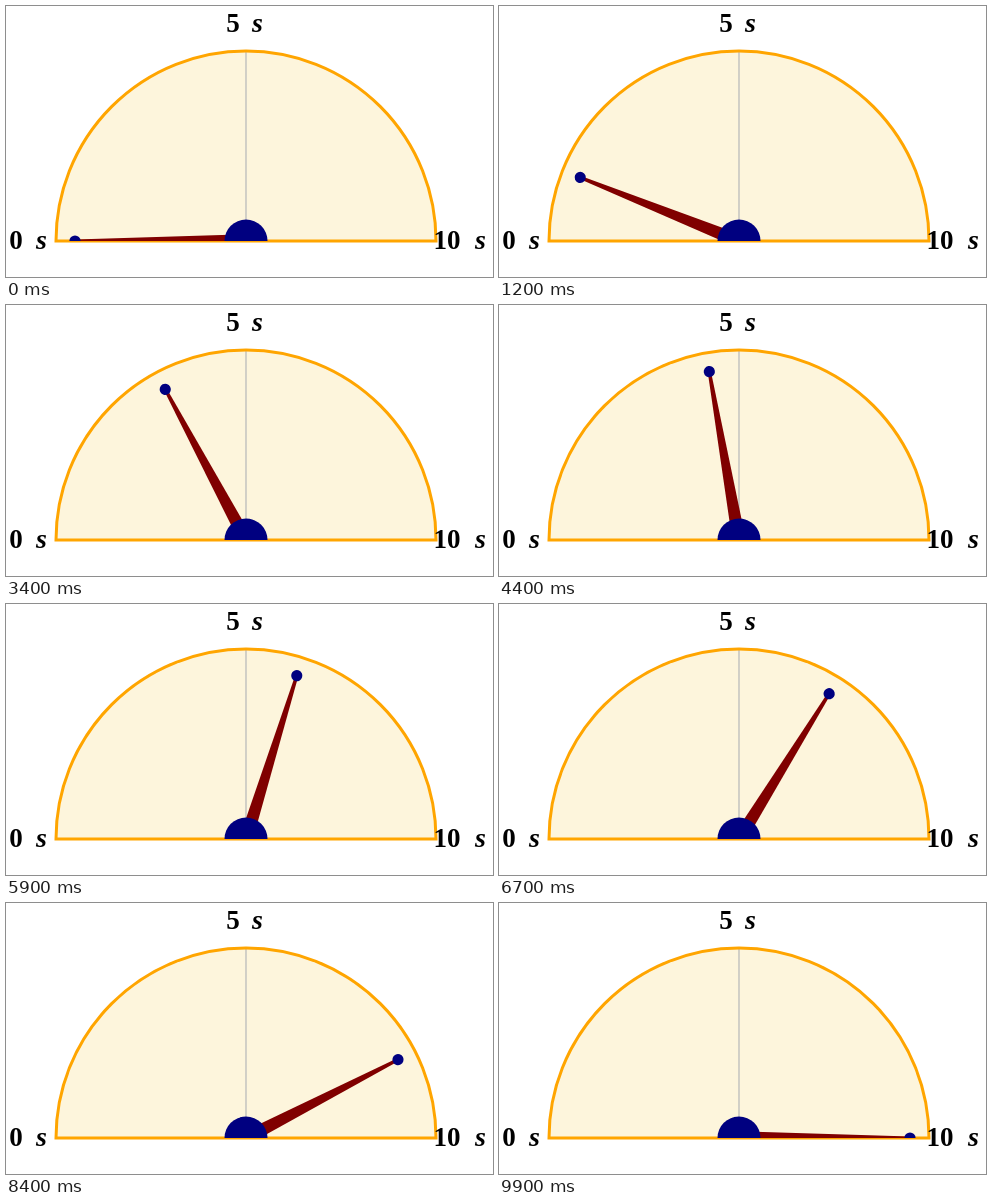
These frames come from a looping animation (487x271 px, 10 s). An HTML page:

```html
<!DOCTYPE html>
<html lang="en">
<head>
<meta charset="utf-8">
<title>Ten second gauge</title>
<style>
  html, body { margin: 0; width: 100%; height: 100%; overflow: hidden; background: #fff; }
  svg { display: block; width: 487px; height: 271px; }
  text { font: bold 27px "Liberation Serif", "Times New Roman", serif; text-anchor: middle; }
  .unit { font-style: italic; font-size: 28px; }
</style>
</head>
<body>
<svg viewBox="0 0 487 271">
  <clipPath id="upper"><rect width="487" height="235"/></clipPath>
  <path d="M50 235A190 190 0 0 1 430 235Z" fill="#fdf5dc"/>
  <path d="M240 45V235" stroke="#bbb" stroke-width="1.3"/>
  <path d="M50 235A190 190 0 0 1 430 235Z" fill="none" stroke="#ffa500" stroke-width="3"/>
  <g clip-path="url(#upper)">
    <g id="needle">
      <path d="M240 228.3L69 233.4V236.6L240 241.7Z" fill="#800000"/>
      <circle cx="69" cy="235" r="5.6" fill="#000080"/>
    </g>
    <circle cx="240" cy="235" r="21.5" fill="#000080"/>
  </g>
  <text x="10" y="243">0</text><text class="unit" x="35.5" y="243">s</text>
  <text x="227" y="26">5</text><text class="unit" x="251.5" y="26">s</text>
  <text x="441" y="243">10</text><text class="unit" x="474.5" y="243">s</text>
</svg>
<script>
  const needle = document.getElementById('needle');
  const STEPS = 100, STEP_MS = 100;
  let start;

  function draw(now) {
    start ??= now;
    const step = Math.floor((now - start) / STEP_MS) % STEPS;
    // The last step lies exactly on the right end of the scale.
    needle.setAttribute('transform', `rotate(${step * 180 / (STEPS - 1)} 240 235)`);
    requestAnimationFrame(draw);
  }
  requestAnimationFrame(draw);
</script>
</body>
</html>
```
